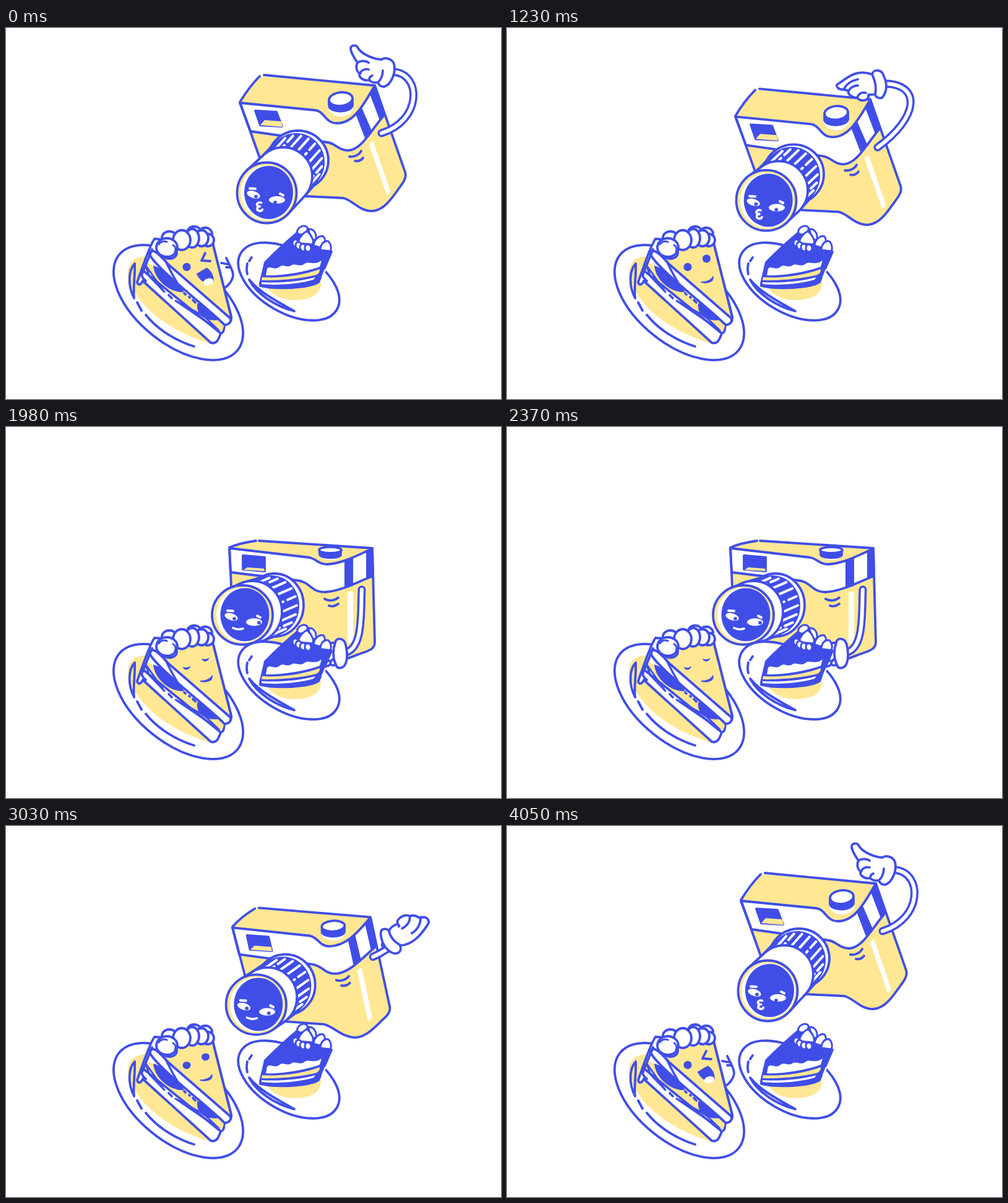
An HTML page for the animation above (4.08 s loop, 800 by 600 pixels).

```html
<!DOCTYPE html>
<html lang="en">
<head>
<meta charset="utf-8">
<title>Camera and cakes</title>
<style>
  html, body { margin: 0; width: 100%; height: 100%; overflow: hidden; background: #fff; }
  svg { display: block; width: 100vw; height: 100vh; }
</style>
</head>
<body>
<svg id="stage" viewBox="0 0 800 600" fill="none" stroke-linecap="round" stroke-linejoin="round"></svg>
<script>
const BLUE = '#404ee7', YELLOW = '#ffe794', WHITE = '#fff', LOOP = 4080, STEP = 30;
const stage = document.getElementById('stage');

// ---- helpers ----
function layer() {
  const g = document.createElementNS(stage.namespaceURI, 'g');
  stage.append(g);
  return g;
}
function shape(parent, d, fill = 'none', stroke = BLUE, width = 3.8) {
  const el = document.createElementNS(stage.namespaceURI, 'path');
  const attrs = { d, fill, stroke, 'stroke-width': width };
  for (const key in attrs) el.setAttribute(key, attrs[key]);
  parent.append(el);
  return el;
}
const fill = (parent, d, color) => shape(parent, d, color, 'none', 0);
const draw = (el, d) => el.setAttribute('d', d);
const show = (el, on) => el.setAttribute('visibility', on ? 'visible' : 'hidden');
const lerp = (a, b, k) => a + (b - a) * k;
const clamp = k => Math.max(0, Math.min(1, k));
const sine = k => (1 - Math.cos(Math.PI * clamp(k))) / 2;
const ramp = (t, from, to) => sine((t - from) / (to - from));
const NUM = /-?\d+(\.\d+)?/g;
const numbers = d => d.match(NUM).map(Number);
function mapNumbers(d, f) {
  let i = 0;
  return d.replace(NUM, n => f(+n, i++).toFixed(2));
}
const mix = (a, b, k) => { const to = numbers(b); return mapNumbers(a, (n, i) => lerp(n, to[i], k)); };
const shift = (d, dx, dy) => mapNumbers(d, (n, i) => n + (i % 2 ? dy : dx));
function oval(x, y, rx, ry, deg = 0) {
  const c = Math.cos(deg * Math.PI / 180), s = Math.sin(deg * Math.PI / 180), k = 0.5523;
  const at = (u, v) => `${(x + u * rx * c - v * ry * s).toFixed(2)} ${(y + u * rx * s + v * ry * c).toFixed(2)} `;
  return 'M' + at(-1, 0) + 'C' + at(-1, -k) + at(-k, -1) + at(0, -1) + 'C' + at(k, -1) + at(1, -k) + at(1, 0)
    + 'C' + at(1, k) + at(k, 1) + at(0, 1) + 'C' + at(-k, 1) + at(-1, k) + at(-1, 0) + 'Z';
}

// ---- camera body: raised and lowered outlines ----
// The first part of the drop is a plain slide, the rest a change of shape.
const SLIDE = 0.2, DX = -9, DY = 22.5;
function pose(up, down, p) {
  if (p < SLIDE) return shift(up, DX * p / SLIDE, DY * p / SLIDE);
  return mix(shift(up, DX, DY), down, (p - SLIDE) / (1 - SLIDE));
}
const camera = layer();
const parts = [];
const part = (up, down, ...style) => parts.push({ el: shape(camera, up, ...style), up, down });
const solid = (up, down, color) => part(up, down, color, 'none', 0);

solid('M410 78C400 88 388 103 378 120L410 210L484 272L545 275C560 278 570 296 592 296C610 295 622 278 636 258C642 250 648 242 645 233L596 93Z',
  'M404 184C390 186 372 190 361 195L364 258L415 349L480 356C500 362 515 378 540 378C555 374 565 369 580 364C588 361 596 358 596 348L592 196Z', YELLOW);
solid('M587 189C588 185 592 183 594 185L621 263C621 266 618 270 615 269Z',
  'M552 270C552 266 560 265 561 268L561 343C560 348 554 351 552 349Z', WHITE);
part('M378 121L500 133C515 135 516 154 535 154C560 154 575 130 596 93L611 141C590 165 575 197 553 198C537 198 533 187 520 185L395 167Z',
  'M361 196L490 211C502 213 504 222 518 222C545 221 570 206 592 197L593 241C570 250 540 266 515 267C492 267 492 250 470 248L363 235Z', WHITE);
solid('M565 139L575 129L591 166L580 178Z', 'M547 215L561 211L561 257L547 261Z', BLUE);
solid('M588 107L596 93L612 140L604 149Z', 'M582 202L592 198L593 241L582 245Z', BLUE);
part('M410 78C400 88 388 103 378 120L410 210M484 272L545 275C560 278 570 296 592 296C610 295 622 278 636 258C642 250 648 242 645 233L596 93L417 76',
  'M404 184C390 186 372 190 361 195L364 258M415 349L480 356C500 362 515 378 540 378C555 374 565 369 580 364C588 361 596 358 596 348L592 196L409 184');
part('M403 134L437 136L446 159L411 157Z', 'M383 208L418 211L418 233L383 230Z', BLUE);
solid('M411 157L418 149L445 151L447 160Z', 'M384 231L390 227L417 229L418 233Z', YELLOW);
solid(oval(541, 129, 20, 14), oval(524, 208, 17, 7), WHITE);
part('M522 117L522 126C524 138 558 137 560 125L560 115Z', 'M507 200L507 206C508 213 541 213 541 206L541 200Z', BLUE);
part(oval(541, 115, 19, 11, -6), oval(524, 199, 18, 5), WHITE);
part('M555 208C563 209 571 205 574 199M564 215C570 216 574 214 577 210',
  'M515 278C522 282 531 281 537 276M522 289C528 291 533 289 537 286');

// ---- lens: each ellipse is [x, y, rx, ry] ----
const lens = {
  rim: { up: [472, 214, 49, 48], down: [434, 288, 47, 51] },
  disc: { up: [469, 217, 46, 47], down: [429, 289, 45, 49] },
  back: { up: [448, 240, 47, 47], down: [398, 299, 48, 50] },
  front: { up: [426, 262, 48, 49], mid: [419, 279, 48.5, 49], down: [382, 304, 49, 48] }
};
const ellipseAt = ({ up, mid = [up[0] + DX, up[1] + DY, up[2], up[3]], down }, p) => up.map((n, i) =>
  p < SLIDE ? lerp(n, mid[i], p / SLIDE) : lerp(mid[i], down[i], (p - SLIDE) / (1 - SLIDE)));

// Tangent quad joining two ellipses.
function tangents(a, b) {
  const dx = b[0] - a[0], dy = b[1] - a[1];
  const touch = ([x, y, rx, ry], side) => {
    const q = side / Math.hypot(rx * dy, ry * dx);
    return `${x - rx * rx * dy * q} ${y + ry * ry * dx * q}`;
  };
  return [touch(a, 1), touch(b, 1), touch(b, -1), touch(a, -1)];
}
const quad = q => `M${q.join('L')}Z`;
const sides = q => `M${q[0]}L${q[1]}M${q[2]}L${q[3]}`;

const rim = shape(camera, '', WHITE), disc = fill(camera, '', BLUE);
const sleeve = shape(camera, '', BLUE), stripes = shape(camera, '', 'none', WHITE, 4);
const back = shape(camera, '', WHITE), barrel = fill(camera, '', WHITE), barrelSides = shape(camera, '');
const front = shape(camera, '', YELLOW), glint = fill(camera, '', WHITE), glass = fill(camera, '', BLUE);
const eyes = fill(camera, '', WHITE), pupils = fill(camera, '', BLUE);
const brows = shape(camera, '', 'none', WHITE, 4), mouth = shape(camera, '', 'none', WHITE, 3.6);

function drawLens(p, reach) {
  const r = ellipseAt(lens.rim, p), d = ellipseAt(lens.disc, p), b = ellipseAt(lens.back, p), f = ellipseAt(lens.front, p);
  f[0] -= 4.5 * reach;
  f[1] += 4.5 * reach;
  draw(rim, oval(...r));
  draw(disc, oval(...d));
  draw(sleeve, quad(tangents(d, b)));
  let lines = '';
  for (let i = 0; i < 9; i++) {
    const a = lerp(lerp(-115, -95, p), lerp(27, 56, p), i / 8) * Math.PI / 180;
    const x = d[0] + (d[2] - 4) * Math.cos(a), y = d[1] + (d[3] - 4) * Math.sin(a);
    const vx = lerp(-16, -23, p), vy = lerp(18, 10, p);
    lines += i % 3 == 1
      ? `M${x} ${y}l${vx * .55} ${vy * .55}m${vx * .3} ${vy * .3}l${vx * .15} ${vy * .15}`
      : `M${x} ${y}l${vx} ${vy}`;
  }
  draw(stripes, lines);
  const q = tangents(b, f);
  draw(back, oval(...b));
  draw(barrel, quad(q));
  draw(barrelSides, sides(q));
  draw(front, oval(...f));
  const [x, y] = f;
  draw(glint, oval(x + 1, y, 43, 44.5));
  draw(glass, oval(x + lerp(3, 4, p), y - .5, 39.5, 43));
  const lx = x + lerp(-21.5, -18, p), ly = y + 3, rx = x + lerp(16.5, 19, p), ry = y + 11.5;
  draw(eyes, oval(lx, ly, 11, 5.5, 18) + oval(rx, ry, 13, 6, 0));
  draw(pupils, oval(lx + lerp(4, 5, p), ly + 3, 3, 2.8) + oval(rx + lerp(-3, 8, p), ry + lerp(4, 1, p), 3, 2.8));
  draw(brows, `M${lx - 6} ${ly - 10}l9 .5M${rx + 5} ${ry - 10}l5 2.5`);
  draw(mouth, p < .5
    ? `M${x - 9} ${y + 16}c-5 -2 -9 3 -6 5c1 1 3 1 4 1c-5 0 -6 6 -2 7c3 1 5 0 6 -2`
    : `M${x - 15} ${y + 21}q8 4 16 1`);
}

// ---- small cake's plate ----
const smallPlate = layer();
shape(smallPlate, oval(457, 410, 90, 50, 30.5), WHITE);
fill(smallPlate, 'M420 416C430 435 450 441 470 440C495 439 510 430 509 410Z', YELLOW);
shape(smallPlate, 'M397 371L393 377M390 381Q388 390 390 398');
shape(smallPlate, 'M393 407C405 430 435 450 466 458C440 443 410 428 393 407Z', WHITE);

// ---- arm and hand poses ----
const HANDS = {
  point: {
    arm: 'M607 170C672 150 672 75 627 71',
    palm: 'M557 34C556 27 567 27 568 31C574 42 592 50 607 51C611 47 624 49 627 58C631 72 622 92 611 95C604 95 602 91 601 88C594 89 589 87 587 84C578 87 568 78 572 74C566 70 565 62 568 56C563 48 558 42 557 34Z',
    lines: 'M568 56C574 52 582 53 586 56M572 74C574 68 580 66 586 67M587 84C587 81 589 78 592 77M601 88C606 84 609 76 609 69'
  },
  press: {
    arm: 'M608 171C662 110 664 65 606 66',
    palm: 'M529 78C527 73 528 69 532 69C546 73 560 64 580 64C578 52 592 45 600 55C613 68 610 84 606 92C600 92 596 90 595 86C592 92 588 96 584 97C584 105 562 105 561 97C550 98 545 92 549 88C540 86 530 84 529 78Z',
    lines: 'M549 88C552 82 556 79 562 78M561 97C562 92 566 89 572 88M584 97C582 94 578 92 574 92M595 86C596 78 590 70 581 65'
  },
  dip: {
    arm: 'M599 193C665 145 670 92 612 90',
    palm: 'M535 97C532 94 532 91 536 90C550 80 565 66 590 75C592 66 606 66 609 78C616 92 613 105 606 113C600 114 596 112 595 107C592 108 588 108 584 108C586 118 572 120 566 113C556 112 550 106 552 102C546 98 538 101 535 97Z',
    lines: 'M545 98C549 90 558 85 567 83M566 113C568 106 574 103 580 105M552 102C554 97 560 93 567 93M595 107C597 98 596 88 591 77'
  },
  tuck: {
    arm: 'M575 263C573 300 578 358 548 365',
    palm: 'M500 370C498 364 502 360 506 360C515 352 524 348 532 349C533 340 546 340 549 352C553 368 551 382 546 387C540 392 534 390 533 384C531 386 527 386 524 384C520 388 514 388 512 384C506 384 502 382 502 378C500 376 500 374 500 370Z',
    lines: 'M502 378C506 374 510 372 514 372M512 384C514 380 518 378 522 378M524 384C524 380 526 377 528 376M533 384C528 374 528 360 532 349'
  },
  reach: {
    arm: 'M577 259C572 300 606 325 596 358',
    palm: 'M512 350C510 344 512 338 518 336C535 331 560 329 578 336C580 329 592 328 596 342C602 355 592 378 584 378C578 379 575 376 576 371C566 378 554 376 548 372C544 380 530 380 526 374C520 374 514 366 516 362C512 358 512 354 512 350Z',
    lines: 'M516 362C522 350 532 346 546 347M526 374C530 362 540 356 552 356M548 372C549 368 553 366 560 366M576 371C580 364 582 350 577 338'
  },
  lift: {
    arm: 'M605 177C660 125 672 66 604 71',
    palm: 'M528 89C525 86 525 82 529 80C545 68 560 55 581 65C580 52 592 49 599 57C609 70 607 88 602 97C596 97 592 94 590 90C588 93 584 94 580 95C582 105 562 106 556 97C548 96 546 91 542 89C538 90 532 92 528 89Z',
    lines: 'M538 89C542 80 552 73 559 72M556 97C558 92 566 89 572 90M580 95C578 92 574 91 572 92M590 90C592 82 588 72 581 66'
  }
};
// time, pose, outward push and turns made on the way there
const HAND_KEYS = [
  [0, 'point', 0, 0], [60, 'point', 0, 0], [480, 'press', 0, 0], [930, 'press', 0, 0], [1230, 'dip', 0, 0],
  [1980, 'tuck', 32, 1], [2490, 'tuck', 0, 0], [2700, 'reach', 0, 0], [3300, 'lift', 12, -1], [3390, 'lift', 0, 0],
  [3780, 'point', 0, 0], [LOOP, 'point', 0, 0]
];
const hand = layer();
const sleeveArm = shape(hand, '', 'none', BLUE, 13), innerArm = shape(hand, '', 'none', WHITE, 6);
const fist = document.createElementNS(stage.namespaceURI, 'g');
hand.append(fist);
const palm = shape(fist, '', WHITE), knuckles = shape(fist, '');

// The arm uncurls sideways while the hand turns about the wrist.
function drawHand(t) {
  const i = HAND_KEYS.findIndex(key => key[0] > t);
  const [t0, from] = HAND_KEYS[i - 1], [t1, to, push, turns] = HAND_KEYS[i];
  const k = ramp(t, t0, t1), out = push * Math.sin(Math.PI * k), a = HANDS[from], b = HANDS[to];
  const arm = mapNumbers(mix(a.arm, b.arm, k), (n, j) => j == 6 ? n + out : n);
  const [wx, wy] = numbers(arm).slice(-2);
  draw(sleeveArm, arm);
  draw(innerArm, arm);
  draw(palm, shift(mix(a.palm, b.palm, k), out, 0));
  draw(knuckles, shift(mix(a.lines, b.lines, k), out, 0));
  fist.setAttribute('transform', `rotate(${360 * turns * k} ${wx} ${wy})`);
}

// ---- small cake ----
const smallCake = layer();
shape(smallCake, 'M411 413L419 379C440 358 458 342 471 331L526 362L505 411C490 421 435 423 411 417Z', BLUE);
fill(smallCake, 'M422 389C428 384 433 392 441 387C448 380 453 389 461 384C468 379 475 388 483 381C490 376 498 385 510 376L507 386C480 396 440 401 420 400Z', WHITE);
fill(smallCake, 'M414 403C445 405 480 400 507 390C507 395 506 396 502 399C480 405 440 409 413 408Z', YELLOW);
fill(smallCake, 'M413 411C440 413 475 410 500 403L497 407C475 414 435 417 413 414Z', WHITE);
shape(smallCake, 'M511 403L516 391', 'none', WHITE, 2.5);
const topping = d => shape(smallCake, d, WHITE, BLUE, 3);
topping(oval(479, 327, 9, 6, -30));
topping('M489 325C498 325 502 332 501 342L492 344Z');
topping('M497 352C498 342 506 335 513 337C517 342 516 350 512 356Z');
topping('M508 359C508 350 514 343 521 345C526 350 526 358 524 361Z');
topping('M472 348C473 339 482 329 487 329C494 335 499 346 495 350Z');
for (const [x, y] of [[468, 348], [473, 352], [480, 355], [488, 356]]) topping(oval(x, y, 5, 6, -10));

// ---- big cake ----
const bigPlate = layer();
shape(bigPlate, oval(278.5, 444, 123, 67, 38.8), WHITE);
fill(bigPlate, 'M235 370C205 365 190 385 200 410C215 450 260 490 335 512L350 490L240 400Z', YELLOW);
shape(bigPlate, 'M208 381C198 392 196 415 207 437C205 420 209 400 208 381Z');
shape(bigPlate, 'M212 444L219 457M226 464C245 488 275 506 304 515');

const wave = layer();
shape(wave, 'M356 372C360 382 368 392 367 401C365 411 359 416 350 422L340 400Z', WHITE, 'none');
shape(wave, 'M356 372C360 382 368 392 367 401C365 411 359 416 354 420M348 380L358 382M356 387L362 387');

const bigCake = layer();
shape(bigCake, 'M240 341C232 352 220 388 212 411C213 417 218 416 221 409L331 509C341 512 344 502 347 494C353 492 352 487 353 480C361 480 365 474 364 467L334 348Z', WHITE);
fill(bigCake, 'M250 362L334 348L362 468L258 377Z', YELLOW);
fill(bigCake, 'M236 384L352 480C352 486 349 490 345 492L222 390L230 380Z', YELLOW);
shape(bigCake, 'M225 383L232 402L256 427Z', WHITE, BLUE, 3);
shape(bigCake, 'M274 441L320 466L344 489Z', WHITE, BLUE, 3);
fill(bigCake, 'M238 384C240 408 265 429 288 427C277 408 258 391 238 384Z', BLUE);
fill(bigCake, 'M309 445C307 463 320 476 347 472C338 457 325 448 309 445Z', BLUE);
shape(bigCake, 'M232 365C236 384 330 456 353 480C361 480 365 474 362 469L262 382C248 366 236 354 232 365Z', WHITE);
shape(bigCake, 'M236 358L219 400M221 390C217 398 219 404 226 409M221 392L346 493M334 348L364 467');
shape(bigCake, 'M258 377C265 392 275 410 284 424', 'none', BLUE, 3.5);
shape(bigCake, 'M263 432L268 437M288 429L290 431M296 435L297 436M302 440L306 444');
const CREAM = [[264, 339, 12, 10], [304, 330, 11, 9], [322, 333, 11, 10], [326, 343, 10, 10], [316, 340, 11, 13],
  [301, 340, 11, 15], [284, 343, 14, 16], [264, 364, 12, 9], [260, 355, 17, 15]];
for (const c of CREAM) shape(bigCake, oval(...c), WHITE);
shape(bigCake, 'M247 350C250 345 256 344 260 346M270 351C274 353 275 358 273 362', 'none', BLUE, 3);

const leftEye = fill(bigCake, '', BLUE), rightEye = fill(bigCake, '', BLUE);
const smile = shape(bigCake, 'M314 411C323 411 331 407 333 402C334 410 325 414 314 411Z', BLUE, BLUE, 1.5);
const wink = shape(bigCake, 'M322 364L316 376L330 377');
const laugh = layer();
shape(laugh, 'M309 398C313 396 319 391 325 389C331 393 335 401 335 409C331 416 317 413 309 398Z', BLUE, BLUE, 2);
fill(laugh, oval(327, 410.5, 8.5, 5.5, -15), WHITE);

// Lower lid stays round while the upper lid drops into a crescent.
function eye(x, y, shut) {
  const w = lerp(6.5, 6, shut), low = lerp(8.7, 8, shut), top = lerp(-8.7, 3.5, shut), tilt = shut;
  return `M${x - w} ${y + tilt}C${x - w} ${y + low} ${x + w} ${y + low} ${x + w} ${y - tilt}C${x + w} ${y + top} ${x - w} ${y + top} ${x - w} ${y + tilt}Z`;
}
function drawFace(t) {
  const happy = t < 1140 || t >= 3840;
  const shut = ramp(t, 1770, 2010) * (1 - ramp(t, 2850, 3090));
  draw(leftEye, eye(292, 386.5, shut));
  draw(rightEye, eye(322.5, 373, shut));
  for (const el of [wink, laugh, wave]) show(el, happy);
  for (const el of [rightEye, smile]) show(el, !happy);
  const hide = ramp(t, 1050, 1140) * (1 - ramp(t, 3840, 3930));
  wave.setAttribute('transform', `translate(${-24 * hide} ${8 * hide})`);
}

// ---- loop ----
function render(t) {
  const drop = ramp(t, 930, 1950) * (1 - ramp(t, 2580, 3500));
  const reach = 1 - ramp(t, 150, 540) * (1 - ramp(t, 3480, 3840));
  for (const { el, up, down } of parts) draw(el, pose(up, down, drop));
  drawLens(drop, reach);
  drawHand(t);
  drawFace(t);
}
const begin = performance.now();
function tick() {
  const t = (performance.now() - begin) % LOOP;
  render(Math.floor(t / STEP) * STEP);
  requestAnimationFrame(tick);
}
tick();
</script>
</body>
</html>
```
